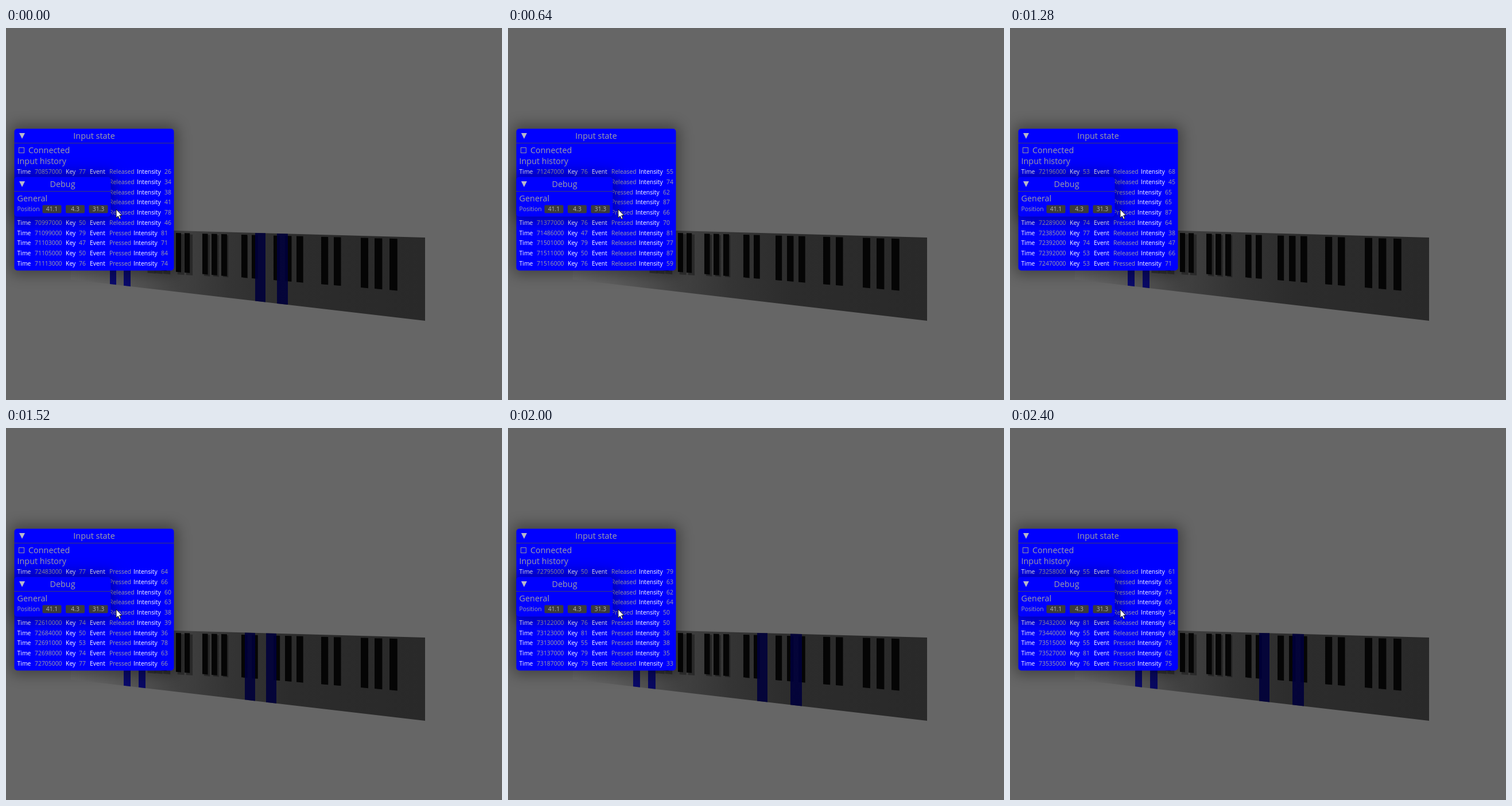
An HTML page with a canvas for the animation above (2480 ms loop, 864 px wide and 648 px high).

```html
<!DOCTYPE html>
<html lang="en">
<head>
<meta charset="utf-8">
<title>Piano input</title>
<style>
  html, body { margin: 0; height: 100%; overflow: hidden; background: #666; }
  canvas { display: block; }
</style>
</head>
<body>
<canvas id="stage" width="864" height="648"></canvas>
<script>
const ctx = document.getElementById('stage').getContext('2d');
const LOOP = 2480, STEP = 80, CLOCK_START = 71201;
const GREY = '#a0a0a4', WHITE = '#fff';

// Lower case: left hand, upper case: right hand. [MIDI key, x, width]
const KEYS = {
  b: [47, 181, 11], d: [50, 205, 12], e: [52, 218, 12], f: [53, 231, 12], g: [55, 244, 13],
  C: [72, 398, 18], D: [74, 416, 18], E: [76, 434, 18], F: [77, 453, 18], G: [79, 472, 19], A: [81, 492, 20]
};

// Key, intensity and delay in ms after the previous event (7 if left out)
const SCORE = `
  F26 D34+80 f38 C41 g78 d46+39 G81+102 b71+4 d84+2 E74+8
  G70+106 b62+14 E55+14 d74 b62+79 G87 d66 E70+30 b81+109 G77+15 d87+10 E59+5
  F77+479 D60+39 C61+8 f59+5 d38+2 C76+72 F60+59 D58 f68+9 d45
  d65+65 f65 F87 D64 F38+96 D47 f66+0 f71+78
  F64+13 D66 d60+93 f63+13 F38 D39 d36+74 f78 D63 F66 d79+90 F63+3 f62+12 D64+9
  e50+303 E50+0 A36+1 g38 G35 G33+50 E44+41 A60+5 g61+25 A65+83 g74+2 E60+16
  E54+66 A64 g68+8 g76+75 A62+12 E75+8`;

// Each event toggles its key; the last state is kept with the event.
const events = [];
let clock = 70850;
const held = new Set('FDCfgd');
for (const [, key, intensity, delay = 7] of SCORE.matchAll(/(\w)(\d+)(?:\+(\d+))?/g)) {
  clock += +delay;
  const pressed = !held.delete(key);
  if (pressed) held.add(key);
  events.push({ time: clock, key, intensity, pressed, held: [...held] });
}

const topEdge = x => 353 + (x - 293) * 0.0275;
const bottomEdge = x => 438 + (x - 113) * 0.1167;

function quad(x0, x1, top, bottom, fill) {
  ctx.fillStyle = fill;
  ctx.beginPath();
  ctx.moveTo(x0, top(x0));
  ctx.lineTo(x1, top(x1));
  ctx.lineTo(x1, bottom(x1));
  ctx.lineTo(x0, bottom(x0));
  ctx.fill();
}

function box(x, y, w, h, r, fill) {
  ctx.fillStyle = fill;
  ctx.beginPath();
  ctx.roundRect(x, y, w, h, r);
  ctx.fill();
}

function text(str, x, y, size = 10.4, color = GREY, align = 'left') {
  ctx.font = `400 ${size}px "Open Sans", "Noto Sans", sans-serif`;
  ctx.fillStyle = color;
  ctx.textAlign = align;
  ctx.fillText(str, x, y);
}

function shade(...stops) {
  const gradient = ctx.createLinearGradient(113, 0, 730, 0);
  stops.forEach(stop => gradient.addColorStop(...stop));
  return gradient;
}
const bodyShade = shade([0, '#6a6a6a'], [0.12, '#5c5c5c'], [0.3, '#414141'], [0.45, '#343434'], [0.62, '#2c2c2c'], [1, '#292929']);
const litShade = shade([0.15, 'rgba(0,0,110,.9)'], [0.5, 'rgba(0,0,58,.9)']);

const BLACK_KEYS = [244, 257, 271, 296, 311, 342, 358, 375, 410, 428, 466, 486, 506, 549, 571, 618, 642, 668];

function drawPiano(pressedKeys) {
  quad(113, 730, topEdge, bottomEdge, bodyShade);
  for (const x of BLACK_KEYS) {
    const w = 9 + (x - 296) * 0.0125;
    const top = v => 357 + (v - 300) * 0.0268;
    const bottom = v => 425 + (v - 300) * 0.085;
    const side = Math.max(0, (430 - x) / 24);
    quad(x + w * 0.3, x + w + side, v => top(v) + 2, v => bottom(v) + side * 0.8, 'rgba(0,0,0,.32)');
    quad(x, x + w, top, bottom, '#050505');
  }
  for (const key of pressedKeys) {
    const [, x, w] = KEYS[key];
    quad(x, x + w, topEdge, bottomEdge, litShade);
  }
}

function drawWindow(title, x, y, w, h) {
  ctx.save();
  ctx.shadowColor = 'rgba(0,0,0,.36)';
  ctx.shadowBlur = 24;
  ctx.shadowOffsetX = 2000;
  box(x - 6 - 2000, y - 6, w + 12, h + 12, 10, '#000');
  ctx.restore();
  box(x + 0.5, y + 0.5, w - 1, h - 1, 5, '#00f');
  ctx.fillStyle = '#3c3c6c';
  ctx.fillRect(x, y + 25, w, 1);
  ctx.fillStyle = '#b8b8c8';
  ctx.beginPath();
  ctx.moveTo(x + 9, y + 8);
  ctx.lineTo(x + 19, y + 8);
  ctx.lineTo(x + 14, y + 18);
  ctx.fill();
  text(title, x + w / 2, y + 17.5, 14.4, GREY, 'center');
}

function drawRow({ time, key, intensity, pressed }, i) {
  const y = 254.3 + i * 17.72, x = pressed ? 222 : 228;
  const put = (str, left, color) => text(str, left, y, 10.4, color);
  put('Time', 19.5, WHITE);
  put(time + '000', 50);
  put('Key', 104, WHITE);
  put(KEYS[key][0], 127);
  put('Event', 146, WHITE);
  put(pressed ? 'Pressed' : 'Released', 180);
  put('Intensity', x, WHITE);
  put(intensity, x + 48);
}

function drawInputState(rows) {
  drawWindow('Input state', 14, 175, 279, 248);
  ctx.strokeStyle = '#999';
  ctx.lineWidth = 1;
  ctx.strokeRect(22.5, 208.5, 9, 9);
  text('Connected', 39, 217.5, 14.4);
  text('Input history', 19.5, 237, 14.4);
  rows.forEach(drawRow);
}

function drawDebug() {
  drawWindow('Debug', 14, 259, 169, 70);
  text('General', 19.5, 302, 14.4);
  text('Position', 19.5, 319.3);
  ['41.1', '4.3', '31.3'].forEach((value, i) => {
    const x = 63.5 + i * 40.5;
    box(x, 308.5, 33, 14, 2, '#3c3c3c');
    text(value, x + 16.5, 319.3, 10.4, '#b4b4b4', 'center');
  });
}

const cursor = new Path2D('M192 316V330.5L195.3 327.5L197.6 332.8L200 331.7L197.7 326.6H202Z');
function drawCursor() {
  ctx.lineWidth = 1;
  ctx.strokeStyle = '#111';
  ctx.fillStyle = '#fff';
  ctx.fill(cursor);
  ctx.stroke(cursor);
}

function draw(now) {
  const t = now % LOOP;
  const limit = CLOCK_START + Math.floor(t / STEP) * STEP;
  const rows = events.filter(event => event.time <= limit).slice(-10);
  ctx.fillStyle = '#666';
  ctx.fillRect(0, 0, 864, 648);
  drawPiano(rows[9].held);
  drawInputState(rows);
  drawDebug();
  drawCursor();
}

const start = performance.now();
function tick() {
  draw(performance.now() - start);
  requestAnimationFrame(tick);
}
tick();
</script>
</body>
</html>
```
